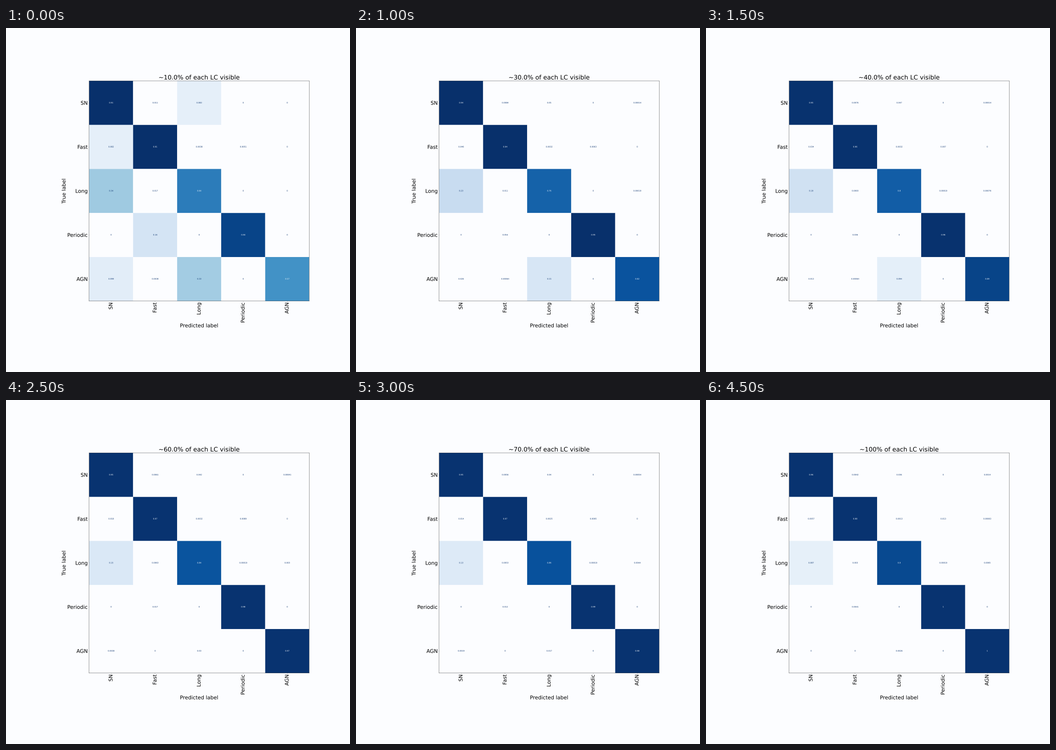
A matplotlib script that plays this animation: 748 by 748 pixels, repeating every 5000 ms.

```python
import numpy as np
import matplotlib.pyplot as plt
from matplotlib.animation import FuncAnimation
from matplotlib.colors import to_rgb
from matplotlib.patches import Rectangle
from matplotlib.patheffects import Normal

STAGE = 748
INCHES = 25
PAPER = "#fcfdff"
STEPS = 10
BLUES = plt.get_cmap("Blues")

# True classes with their sample counts.
SAMPLES = {"SN": 7350, "Fast": 1580, "Long": 5260, "Periodic": 980, "AGN": 1560}
LABELS = list(SAMPLES)
N = len(LABELS)

# Confusions by "true predicted": peak, rate and power of peak * exp(-rate * t**power).
FADING = {
    "SN Fast": (.011, .14, .88),
    "SN Long": (.083, .4, .33),
    "Fast SN": (.082, .296, 1),
    "Fast Long": (.0035, .002, 2.8),
    "Long SN": (.34, .23, .81),
    "Long Fast": (.017, .22, .93),
    "Periodic Fast": (.16, .62, .8),
    "AGN SN": (.099, .66, 1),
    "AGN Fast": (.0038, 1.4, .5),
    "AGN Long": (.33, .32, 1.25),
}
# The same curve run backwards, so the peak comes last.
GROWING = {
    "SN AGN": (.0014, .25, 1.2),
    "Fast Periodic": (.013, .104, 1),
    "Fast AGN": (.00063, 1, 1),
    "Long Periodic": (.00019, .1, 1),
    "Long AGN": (.0064, .024, 2.5),
}

plt.rcParams.update({
    "font.family": "DejaVu Sans",
    "font.size": 27,
    "axes.linewidth": 1,
})


def matrix(step):
    m = np.zeros((N, N))
    for curves, t in ((FADING, step), (GROWING, STEPS - 1 - step)):
        for pair, (peak, rate, power) in curves.items():
            true, predicted = pair.split()
            count = SAMPLES[true]
            value = peak * np.exp(-rate * t ** power)
            m[LABELS.index(true), LABELS.index(predicted)] = np.rint(value * count) / count
    np.fill_diagonal(m, 1 - m.sum(axis=1))
    return m


def tones(m):
    """Blues colours, with the palest and darkest cells each sharing one tone."""
    level = m / m.max()
    dark = level > .945
    level[dark] = level[dark].mean()
    rgb = BLUES(level)[..., :3]
    rgb[level < .075] = to_rgb(PAPER)
    return rgb


fig = plt.figure(figsize=(INCHES, INCHES), dpi=STAGE / INCHES, facecolor=PAPER)
left, top, side = 180.65, 115, 478.75
ax = fig.add_axes([left / STAGE, 1 - (top + side) / STAGE,
                   side / STAGE, side / STAGE], facecolor=PAPER)
ax.set(xlim=(-.5, N - .5), ylim=(N - .5, -.5),
       xlabel="Predicted label", ylabel="True label")
ax.set_xticks(range(N), LABELS, rotation="vertical")
ax.set_yticks(range(N), LABELS)
for spine in ax.spines.values():
    spine.set_snap(False)
title = ax.set_title("")

cells = {}
for row, col in np.ndindex(N, N):
    box = ax.add_patch(Rectangle((col - .5, row - .5), 1, 1, lw=0, snap=False))
    text = ax.text(col, row, "", size=10, ha="center", va="center")
    cells[row, col] = box, text

# Draw glyphs as outlines so that small text keeps its exact spacing.
for text in fig.findobj(plt.Text):
    text.set_path_effects([Normal()])


def draw(step):
    m = matrix(step)
    rgb = tones(m)
    middle = (m.max() + m.min()) / 2
    for pos, (box, text) in cells.items():
        box.set_facecolor(rgb[pos])
        text.set_text(f"{m[pos]:.2g}")
        text.set_color(BLUES(0.0 if m[pos] > middle else 1.0))
    share = f"{100 * (step + 1) / STEPS:#.3g}".rstrip(".")
    title.set_text(f"~{share}% of each LC visible")


anim = FuncAnimation(fig, draw, frames=STEPS, interval=500, repeat=True,
                     repeat_delay=0, init_func=lambda: draw(0))
plt.show()
```
